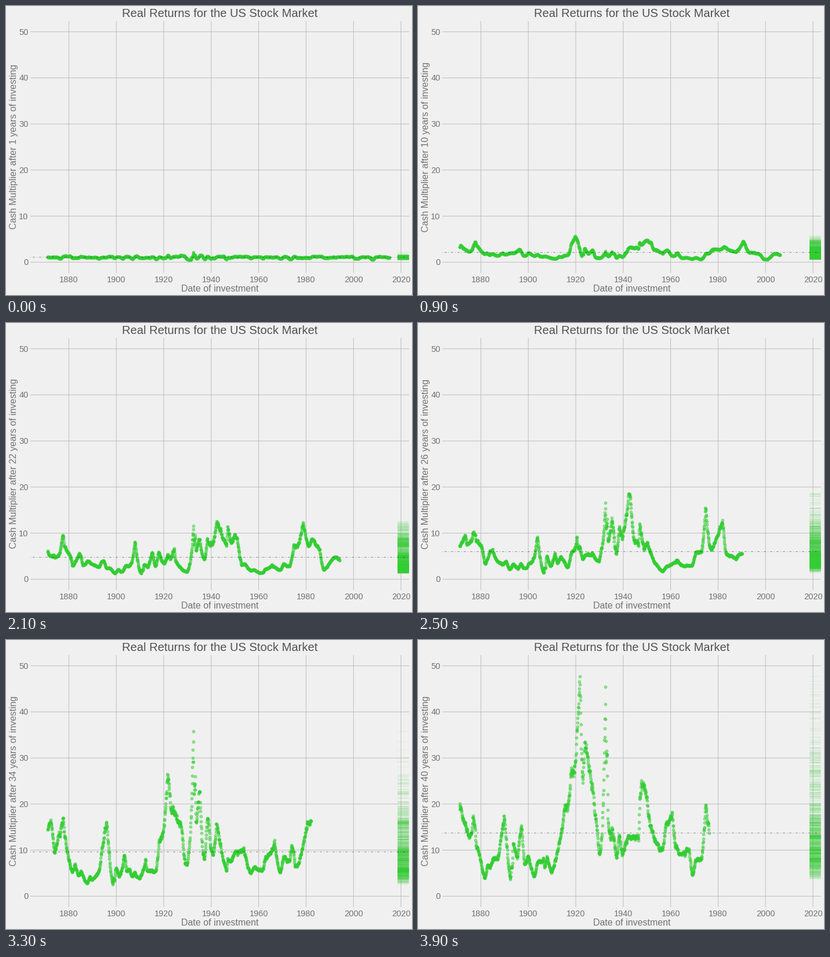
A matplotlib script for the animation above (4000 ms loop, 700x500 px).

```python
import numpy as np
import matplotlib.pyplot as plt
from matplotlib.animation import FuncAnimation
from matplotlib.collections import LineCollection

W, H, DPI = 700, 500, 100
PX = 72 / DPI                      # one pixel in points
FRAMES, INTERVAL = 40, 100
BACK, GRID, SOFT, DARK = "#F0F0F0", "#BDBDBD", "#737373", "#525252"
GREEN = "#32CD32"
LEFT, RIGHT, TOP, BOTTOM = 41.9, 694.6, 25.5, 462
X_ORIGIN, X_SCALE = 108.4, 4.09    # pixel of 1880, pixels per year
Y_ORIGIN, Y_SCALE = 443.3, 7.974   # pixel of zero, pixels per unit
YEARS, VALUES = range(1880, 2021, 20), range(0, 51, 10)

plt.rcParams["font.family"] = "Liberation Sans"

# Booms and crashes: year, log of real wealth with dividends reinvested
TURNS = [
    (1871, 0), (1876, 0.46), (1877.45, 0.16), (1881.45, 1.29), (1885, 1.19),
    (1887, 1.61), (1892.5, 1.93), (1893.6, 1.70), (1896.6, 1.89),
    (1899.3, 2.46), (1900, 2.27), (1902.5, 2.69), (1903.8, 2.42),
    (1906.4, 2.95), (1907.87, 2.53), (1909.65, 3.03), (1914.9, 2.90),
    (1916.6, 3.20), (1917.95, 2.70), (1919.55, 2.92), (1921.6, 2.67),
    (1922.8, 3.17), (1923.8, 3.06), (1927, 3.71), (1929.7, 4.67),
    (1931, 4.15), (1932.45, 3.24), (1932.7, 3.75), (1933.2, 3.62),
    (1933.55, 4.18), (1935.2, 3.93), (1937.15, 4.75), (1938.3, 4.20),
    (1939.5, 4.54), (1942.3, 4.08), (1946.4, 5.02), (1946.85, 4.66),
    (1949.45, 4.64), (1956.6, 6.17), (1957.95, 5.99), (1961.95, 6.58),
    (1962.45, 6.40), (1968.9, 7.07), (1970.45, 6.71), (1973, 7.15),
    (1974.75, 6.49), (1976.2, 6.84), (1982.55, 6.68), (1987.6, 7.84),
    (1990.78, 7.73), (1995, 8.15), (2000.6, 9.26), (2003, 8.67),
    (2007.78, 9.24), (2009.2, 8.54), (2014.5, 9.50), (2016.1, 9.49),
]


def wealth_curve(months=1742):
    """Monthly dates and log wealth: the turns plus small wandering noise."""
    dates = 1871 + (np.arange(months) + 0.5) / 12
    noise = np.random.default_rng(4).normal(0, 0.014, months)
    for m in range(1, months):
        noise[m] += 0.7 * noise[m - 1]
    return dates, np.interp(dates, *np.array(TURNS).T) + noise


dates, log_wealth = wealth_curve()

fig = plt.figure(figsize=(W / DPI, H / DPI), dpi=DPI, facecolor=BACK)
ax = fig.add_axes([LEFT / W, 1 - BOTTOM / H,
                   (RIGHT - LEFT) / W, (BOTTOM - TOP) / H])
ax.set_xlim(1880 + (LEFT - X_ORIGIN) / X_SCALE,
            1880 + (RIGHT - X_ORIGIN) / X_SCALE)
ax.set_ylim((Y_ORIGIN - BOTTOM) / Y_SCALE, (Y_ORIGIN - TOP) / Y_SCALE)
ax.axis("off")


def label(x, y, text, size, color=SOFT, ha="center", rotation=0):
    """Text with its baseline at a pixel position counted from the top left."""
    return fig.text(x / W, 1 - y / H, text, fontsize=size * PX, color=color,
                    ha=ha, va="baseline", rotation=rotation,
                    rotation_mode="anchor")


label(369, 19, "Real Returns for the US Stock Market", 20.1, DARK)
label(369, 494, "Date of investment", 16)
y_title = label(18, 243.5, "", 16, rotation=90)
for year in YEARS:
    ax.axvline(year, color=GRID, lw=PX, snap=False, zorder=1)
    label(X_ORIGIN + (year - 1880) * X_SCALE, 478, str(year), 14.5)
for value in VALUES:
    ax.axhline(value, color=GRID, lw=PX, snap=False, zorder=1)
    label(38.5, Y_ORIGIN - value * Y_SCALE + 5, str(value), 14.5, ha="right")

points, = ax.plot([], [], "o", color=GREEN, alpha=0.5, ms=4.7 * PX, mew=PX,
                  zorder=3)
rug = LineCollection([], colors=GREEN, alpha=0.1, linewidths=1.07 * PX,
                     transform=ax.get_yaxis_transform(), snap=False, zorder=4)
ax.add_collection(rug, autolim=False)
average = ax.axhline(0, color="black", alpha=0.4, lw=PX, snap=False,
                     ls=(0, (1, 3, 4, 3)), dash_capstyle="butt", zorder=5)


def draw(frame):
    years = frame + 1
    span = 12 * years
    multiple = np.exp(log_wealth[span:] - log_wealth[:-span])
    points.set_data(dates[:-span], multiple)
    rug.set_segments([[(0.97, m), (1, m)] for m in multiple])
    average.set_ydata([multiple.mean()] * 2)
    y_title.set_text(f"Cash Multiplier after {years} years of investing")
    return points, rug, average, y_title


anim = FuncAnimation(fig, draw, frames=FRAMES, interval=INTERVAL,
                     repeat=True, repeat_delay=0)
plt.show()
```
